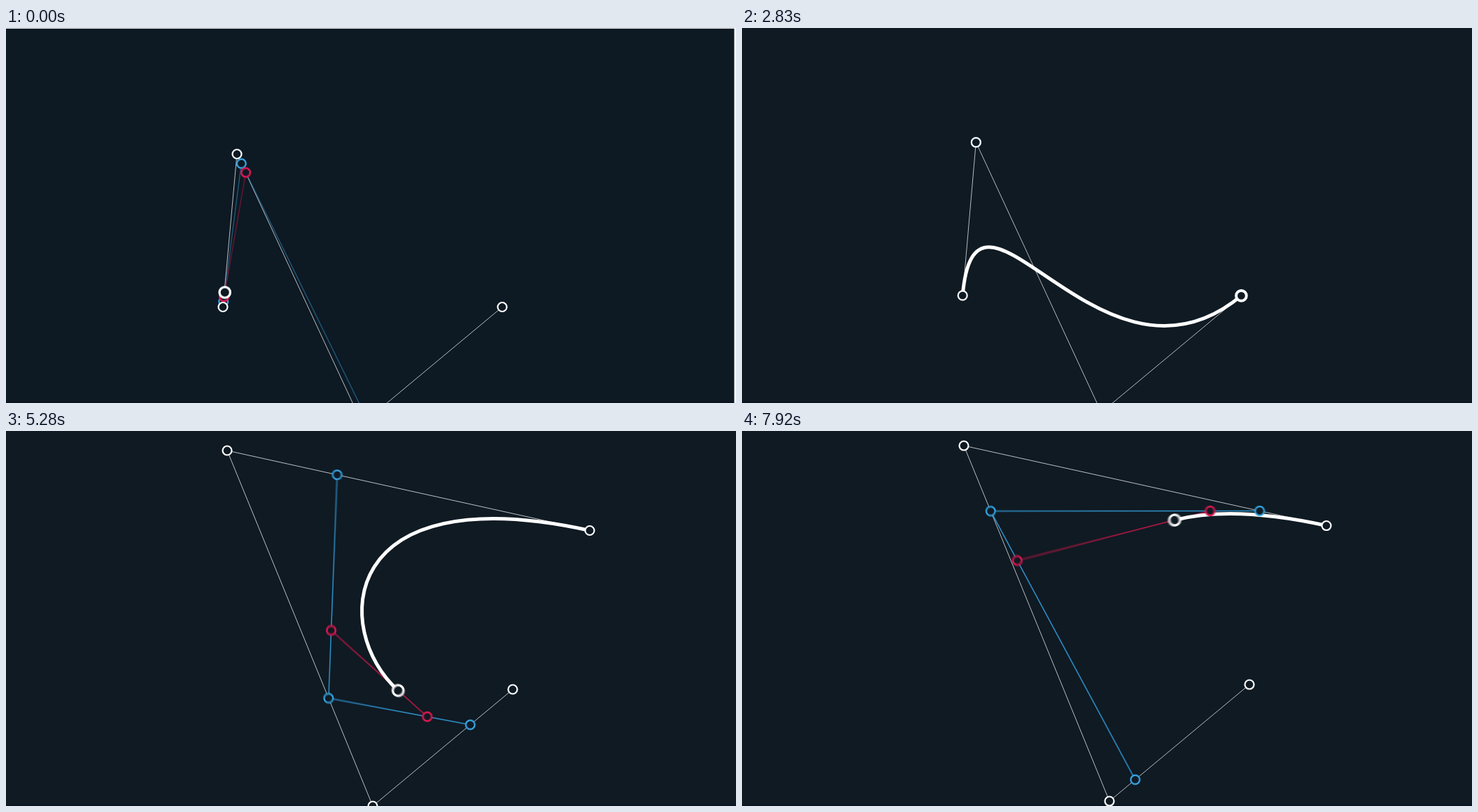
An HTML page with a canvas for the animation above (8 s loop, 1043 px wide and 537 px high).

```html
<!DOCTYPE html>
<html lang="en">
<head>
<meta charset="utf-8">
<title>Cubic curve construction</title>
<style>
  html, body { margin: 0; width: 100%; height: 100%; overflow: hidden; background: #0f1a23; }
  canvas, svg { position: absolute; left: 0; top: 0; width: 1043px; height: 537px; display: block; }
  .tip { font: 500 15px Roboto, "Noto Sans CJK SC", "Noto Sans CJK", sans-serif; }
</style>
</head>
<body>
<canvas id="stage" width="1043" height="537"></canvas>
<svg viewBox="0 0 1043 537">
  <g id="frame">
    <rect width="1043" height="1" fill="#dfe2e4"/>
    <rect x="1040.5" width="2.5" height="537" fill="#fff"/>
  </g>
  <g id="info">
    <circle cx="1006.5" cy="28.5" r="11.3" fill="#fff"/>
    <path d="M1005.2 22h2.6v2.6h-2.6zM1005.2 26.8h2.6v8h-2.6z" fill="#0d1923"/>
    <rect x="838" y="57" width="190" height="25" rx="2" fill="#12191f"/>
    <text class="tip" x="932" y="74" text-anchor="middle" fill="#5b6167">来自“Linna Torvéd”的卡片</text>
    <path d="M1013 -8V6.5L1016 3.6L1018.3 9L1020.8 8L1018.6 2.8H1022.5Z" fill="#fff"/>
  </g>
  <g id="pip">
    <circle cx="1009.5" cy="396.5" r="21.5" fill="#14191d"/>
    <g fill="none" stroke="#c9cccf" stroke-width="2">
      <path d="M1021 399V390a2 2 0 0 0-2-2H999.500a2 2 0 0 0-2 2V406a2 2 0 0 0 2 2H1011"/>
      <path d="M1002.500 392.500L1008.500 398.500M1009 393.500V399H1003.500" stroke-width="1.8"/>
    </g>
    <rect x="1013" y="401" width="10" height="8" rx="1.5" fill="#c9cccf"/>
  </g>
</svg>
<script>
const W = 1043, H = 537, LOOP = 8000;
const CUT = 2380, FREEZE = 2170;         // the first shot pauses, then cuts
const TOP = 2551, BACK = 4205, HALF = 2898;
const SHUTTER = 12, SAMPLES = 9;
const WHITE = '#fff', BLUE = '#38a4e2', RED = '#dc1850';

const byId = id => document.getElementById(id);
const out = byId('stage').getContext('2d');
const layer = document.createElement('canvas');
layer.width = W;
layer.height = H;
const g = layer.getContext('2d');

const mix = (a, b, k) => [a[0] + (b[0] - a[0]) * k, a[1] + (b[1] - a[1]) * k];
const ramp = (t, from, to) => Math.min(1, Math.max(0, (t - from) / (to - from)));
const ease = (t, from, to) => {
  const p = ramp(t, from, to);
  return p * p * (3 - 2 * p);
};

// Curve parameter: cosine swing with a rest at the far end.
function progress(t) {
  if (t < TOP) return (1 - Math.cos(Math.PI * (t + HALF - TOP) / HALF)) / 2;
  if (t < BACK) return 1;
  return (1 + Math.cos(Math.PI * (t - BACK) / HALF)) / 2;
}

// Position of the last control point; the others are relative to it.
function anchor(t, firstShot) {
  if (firstShot) return [709, 399.5];
  const a = mix([713.3, 383.5], [724, 370], ease(t, 2780, 3750));
  return mix(a, [725, 363], ease(t, 6870, 7950));
}

function controls(t, firstShot) {
  const k = ease(t, 2800, 4150);
  const p0 = mix([-399, 0], [110, -227.5], k);
  const p1 = mix([-379, -219], [-408, -342], k);
  p1[1] -= 90 * Math.sin(Math.PI * k);
  const [ax, ay] = anchor(t, firstShot);
  return [p0, p1, [-200, 167], [0, 0]].map(([x, y]) => [x + ax, y + ay]);
}

const lerpAll = (pts, u) => pts.slice(1).map((p, i) => mix(pts[i], p, u));

function polyline(pts, color, width, alpha) {
  g.globalAlpha = alpha;
  g.strokeStyle = color;
  g.lineWidth = width;
  g.beginPath();
  pts.forEach(p => g.lineTo(...p));
  g.stroke();
  g.globalAlpha = 1;
}

function ring(p, r, color, width, fill) {
  g.beginPath();
  g.arc(p[0], p[1], r, 0, 7);
  g.fillStyle = fill;
  g.fill();
  g.strokeStyle = color;
  g.lineWidth = width;
  g.stroke();
}

function drawScene(t, firstShot) {
  const u = progress(firstShot ? Math.min(t, FREEZE) : t);
  const bg = firstShot ? '#0d1923' : '#0f1a23';
  const pts = controls(t, firstShot);
  const blues = lerpAll(pts, u);
  const reds = lerpAll(blues, u);
  const [tip] = lerpAll(reds, u);
  const fade = Math.min(1, 15 * u * (1 - u));

  g.fillStyle = bg;
  g.fillRect(0, 0, W, H);
  g.fillStyle = '#0a1421';
  g.fillRect(0, H - 2, W, 2);

  polyline(pts, WHITE, 0.9, 0.8);
  polyline(blues, BLUE, 1.6, 0.85 * fade);
  polyline(reds, RED, 1.8, 0.75 * fade);

  g.strokeStyle = WHITE;
  g.lineWidth = 5;
  g.beginPath();
  g.moveTo(...pts[0]);
  g.bezierCurveTo(...blues[0], ...reds[0], ...tip);
  g.stroke();

  blues.forEach(p => ring(p, 6.4, BLUE, 2.4, bg));
  reds.forEach(p => ring(p, 6.3, RED, 2.7, bg));
  ring(tip, 7.7, WHITE, 3.3, bg);
  pts.forEach(p => ring(p, 6.5, WHITE, 2.2, bg));
}

function render(t) {
  const firstShot = t < CUT;
  // Average several moments to get motion blur.
  for (let i = 0; i < SAMPLES; i++) {
    drawScene(t + SHUTTER * ((i + 0.5) / SAMPLES - 0.5), firstShot);
    out.globalAlpha = 1 / (i + 1);
    out.drawImage(layer, 0, 0);
  }
  const shown = ramp(t, 1300, 1400);
  byId('frame').style.opacity = firstShot ? 1 : 0;
  byId('info').style.opacity = shown * (t < 1620 ? 1 : 0);
  byId('pip').style.opacity = shown * (1 - ramp(t, 1680, 1800));
}

const start = performance.now();
function tick() {
  render((performance.now() - start) % LOOP);
  requestAnimationFrame(tick);
}
tick();
</script>
</body>
</html>
```
